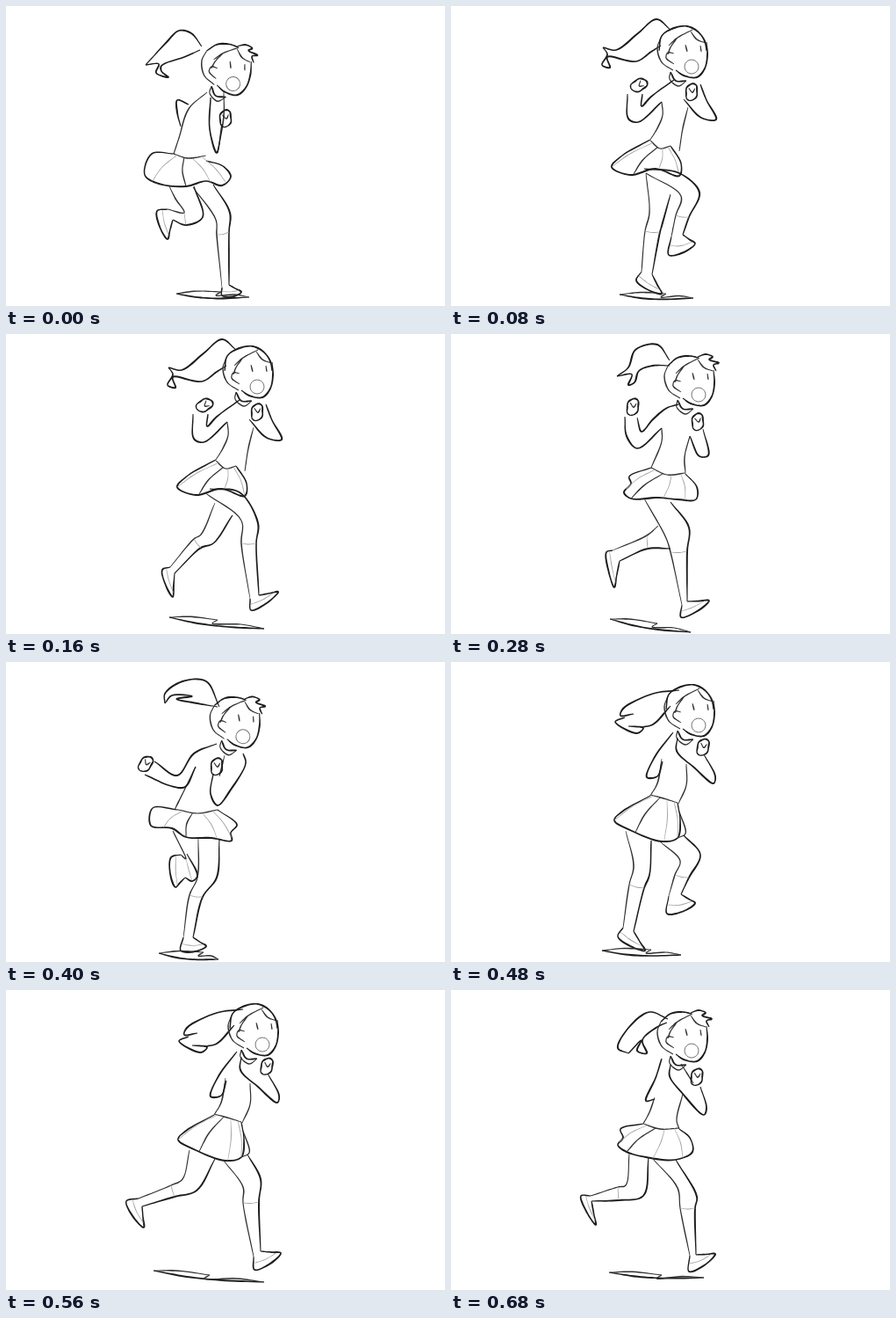
Recreate the animation shown at these times as an HTML page. Size 500 by 341 pixels, loop 0.8 s.

```html
<!DOCTYPE html>
<html lang="en">
<head>
<meta charset="utf-8">
<title>Run cycle</title>
<style>
html, body { margin: 0; width: 100%; height: 100%; overflow: hidden; background: #fff; }
svg { display: block; width: 100%; height: 100%; }
.pose { visibility: hidden; animation: 800ms step-end infinite; }
.short { animation-name: short; }
.long { animation-name: long; }
@keyframes short { 0% { visibility: visible; } 10%, 100% { visibility: hidden; } }
@keyframes long { 0% { visibility: visible; } 15%, 100% { visibility: hidden; } }
</style>
</head>
<body>
<svg id="stage" viewBox="0 0 500 341"></svg>
<script>
const NS = 'http://www.w3.org/2000/svg';
const stage = document.getElementById('stage');
const pens = { bold: [1.9, '#1c1c1c'], mid: [1.4, '#303030'], light: [.9, '#a4a4a4'] };

function add(parent, tag, attrs) {
  const el = document.createElementNS(NS, tag);
  for (const k in attrs) el.setAttribute(k, attrs[k]);
  return parent.appendChild(el);
}

const mix = (a, b, u) => [a[0] + (b[0] - a[0]) * u, a[1] + (b[1] - a[1]) * u];
const shift = (p, x, y) => [p[0] + x, p[1] + y];
const gap = (a, b) => Math.hypot(b[0] - a[0], b[1] - a[1]);

function points(text) {
  const n = text.split(' ').map(Number), out = [];
  for (let i = 0; i < n.length; i += 2) out.push([n[i], n[i + 1]]);
  return out;
}

// Centripetal spline through the points.
function curve(pts) {
  const last = pts.length - 1, out = [];
  const span = pts.slice(1).map((p, i) => Math.sqrt(gap(pts[i], p)) || 1);
  const slope = pts.map((p, i) => [0, 1].map(k => {
    const rise = j => (pts[j + 1][k] - pts[j][k]) / span[j];
    if (i === 0) return rise(0);
    if (i === last) return rise(last - 1);
    return (rise(i - 1) * span[i] + rise(i) * span[i - 1]) / (span[i - 1] + span[i]);
  }));
  for (let i = 0; i < last; i++) {
    for (let s = i ? 1 : 0; s <= 8; s++) {
      const u = s / 8, v = 1 - u;
      out.push([0, 1].map(k =>
        pts[i][k] * v * v * (1 + 2 * u) + pts[i + 1][k] * u * u * (3 - 2 * u) +
        span[i] * u * v * (slope[i][k] * v - slope[i + 1][k] * u)));
    }
  }
  return out;
}

// Pen line that swells in the middle and thins at both ends.
function ink(g, pts, pen = 'mid') {
  const [width, fill] = pens[pen];
  const line = curve(pts), end = line.length - 1, left = [], right = [];
  line.forEach(([x, y], i) => {
    const p = line[Math.max(0, i - 1)], q = line[Math.min(end, i + 1)];
    const swell = .55 + .45 * Math.sqrt(Math.sin(Math.PI * i / end) + 1e-6);
    const r = width / 2 * swell * (1 + .13 * Math.sin(i * .5 + pts[0][0])) / (gap(p, q) || 1);
    const dx = (q[0] - p[0]) * r, dy = (q[1] - p[1]) * r;
    left.push((x - dy).toFixed(1) + ' ' + (y + dx).toFixed(1));
    right.unshift((x + dy).toFixed(1) + ' ' + (y - dx).toFixed(1));
  });
  add(g, 'path', { d: 'M' + left.concat(right).join('L') + 'Z', fill });
}

const strokes = (g, text, pen) => text.split('/').forEach(s => ink(g, points(s), pen));

// The head is drawn around its own centre.
const face = {
  bold: '29 -12 30 3 27 18 18 28 3 26 -6 20/-12 22 -6 32 6 32',
  mid: '-23 -17 -27 -5 -22 11 -9 20/-8 1 -15 0 -17 6 -8 13/5 -9 7 -1/22 -8 23 -1/-12 22 -13 30 -3 38 6 32',
  bangs: '-14 -8 -4 -17 13 -26/-5 -16 -12 -6 -15 2/11 -24 18 -15 28 -11'
};
const tops = {
  smooth: '-25 -2 -22 -19 -8 -28 7 -30 19 -24 27 -13 29 -2',
  tuft: '-23 -17 -12 -26 2 -28 12 -26/11 -27 20 -30 28 -27 24 -24 35 -20 29 -18 32 -11'
};

function drawHead(g, [x, y, turn, top]) {
  const h = add(g, 'g', { transform: `translate(${x} ${y}) rotate(${turn})` });
  strokes(h, face.bold, 'bold');
  strokes(h, face.mid);
  strokes(h, face.bangs);
  strokes(h, tops[top], 'bold');
  add(h, 'ellipse', { cx: 12, cy: 16, rx: 8, ry: 8, fill: 'none', stroke: '#777' });
}

function drawFist(g, [x, y, turn]) {
  const f = add(g, 'g', { transform: `translate(${x} ${y}) rotate(${turn})` });
  const ring = [];
  for (let a = 0; a <= 10; a++) {
    const t = a * Math.PI / 5 + 1.6, r = 1 + .08 * Math.sin(a * 2.5);
    ring.push([6.5 * r * Math.cos(t), 10 * r * Math.sin(t)]);
  }
  ink(f, ring, 'bold');
  ink(f, [[-4, -4], [1, 0], [3, -5]]);
}

// Folds run from the waist to the hem.
function drawSkirt(g, outline, waist) {
  const rim = points(outline), top = points(waist);
  ink(g, rim, 'bold');
  ink(g, top);
  const hem = curve(rim), belt = curve(top);
  const pick = (line, u) => line[Math.round(u * (line.length - 1))];
  for (const u of [.15, .4, .65, .85]) {
    const a = pick(belt, u), b = pick(hem, .2 + .6 * u);
    ink(g, [a, shift(mix(a, b, .5), u < .6 ? -3 : 2, -1), b], u === .4 ? 'mid' : 'light');
  }
}

// Two contours end at the ankle; the sock line joins the points before it.
function drawLeg(g, [back, front, heel, toe]) {
  const a = points(back), b = points(front);
  const A = a[a.length - 1], B = b[b.length - 1];
  ink(g, a);
  ink(g, b, 'bold');
  const p = a[a.length - 2], q = b[b.length - 2], cuff = mix(p, q, .5);
  ink(g, [p, shift(cuff, 0, 1), q], 'light');
  const ankle = mix(A, B, .5), sole = mix(heel, toe, .5), d = gap(ankle, sole) || 1;
  const arch = mix(ankle, sole, 1 + 4 / d);
  ink(g, [A, heel, arch, toe, mix(toe, B, .45), B], 'bold');
  ink(g, [mix(A, heel, .5), mix(ankle, sole, .75), mix(toe, B, .2)], 'light');
}

function drawShadow(g, [start, end, kink]) {
  ink(g, [start, shift(mix(start, kink, .45), 0, -2), kink]);
  ink(g, [start, shift(mix(start, end, .3), 0, 3), shift(mix(start, end, .6), 0, 3), end], 'bold');
  ink(g, [kink, shift(kink, -6, 4), mix(kink, end, .5), end]);
}

function drawUpper(g, p) {
  strokes(g, p.hair, 'bold');
  drawHead(g, p.head);
  strokes(g, p.body);
  strokes(g, p.arms, 'bold');
  p.fists.forEach(f => drawFist(g, f));
  drawSkirt(g, p.skirt, p.waist);
}

const passRight = {
  head: [249, 71, 8, 'tuft'],
  hair: '223 46 211 31 197 28 183 41 159 67/159 67 174 66 171 76 185 81 177 74 177 68 203 58 221 50',
  body: '229 98 208 117 197 150 191 168/248 98 248 125 241 167',
  arms: '233 104 232 140 240 167 246 134/208 112 195 107 195 121 199 137',
  fists: [[250, 128, 5]],
  skirt: '192 168 166 168 158 192 174 202 205 205 228 199 246 204 256 194 247 182 228 176',
  waist: '191 168 207 173 228 170',
  legs: [
    ['186 205 193 219 203 235 184 231', '214 205 224 240 205 249 190 243', [172, 233], [184, 265]],
    ['213 206 239 243 240 260 246 320', '236 203 255 235 254 257 254 317', [246, 329], [268, 325]]
  ],
  shadow: [[194, 327], [277, 331], [245, 325]]
};

const leapRight = {
  head: [274, 44, 0, 'smooth'],
  hair: '262 18 246 6 225 22 200 41 185 38/185 38 190 46 184 58 193 61 190 49 223 54 240 43 251 36',
  body: '252 100 253 115 247 130 239 143/282 106 276 130 272 156',
  arms: '266 75 240 94 229 105 230 91/252 100 225 123 214 119 213 91/296 80 303 98 314 120 297 118 277 97',
  fists: [[226, 81, 65], [286, 89, 10]],
  skirt: '239 143 207 161 195 174 216 183 245 176 272 184 274 170 262 150',
  waist: '239 144 250 153 262 150',
  legs: [
    ['226 180 268 212 268 238 278 301', '232 176 266 180 287 215 285 238 288 297', [279, 314], [310, 293]],
    ['238 192 222 228 214 233 187 265', '258 206 236 238 222 243 192 272', [178, 268], [190, 299]]
  ],
  shadow: [[186, 322], [294, 335], [241, 325]]
};

const landRight = {
  head: [270, 53, 0, 'tuft'],
  hair: '249 30 235 12 210 18 202 38 189 48/189 48 206 46 202 58 209 55 214 42 230 36 249 36',
  body: '240 107 240 122 228 152/272 116 266 140 267 158',
  arms: '212 95 217 111 230 97 246 84 259 80/198 94 200 116 212 130 240 107/287 108 293 138 283 139 272 116',
  fists: [[207, 83, 15], [281, 100, 5]],
  skirt: '228 152 203 162 205 170 197 180 205 187 236 186 258 188 279 188 280 174 267 159',
  waist: '228 152 246 160 267 158',
  legs: [
    ['220 187 245 232 250 248 263 308', '250 191 271 220 269 247 269 304', [262, 322], [294, 303]],
    ['236 218 223 229 184 246', '250 244 224 244 192 258', [177, 248], [186, 288]]
  ],
  shadow: [[181, 324], [273, 339], [235, 329]]
};

const passLeft = {
  head: [259, 68, 4, 'tuft'],
  hair: '243 51 228 22 201 22 181 36 181 47/181 47 189 38 212 39 194 42 218 47 241 51',
  body: '216 119 198 156 192 168/249 106 243 130',
  arms: '169 113 195 129 214 104 240 93/158 128 188 141 204 142 216 119/270 104 273 115 256 145 241 163 233 150 236 127',
  fists: [[159, 116, 40], [240, 119, 10]],
  skirt: '196 168 167 166 165 186 189 189 205 199 234 200 257 203 256 194 263 185 241 168',
  waist: '196 168 218 172 241 168',
  legs: [
    ['190 192 205 224 199 219', '206 218 218 243 212 249 204 245', [188, 222], [193, 256]],
    ['219 199 218 245 209 265 202 313', '243 202 240 245 224 267 213 313', [199, 328], [228, 323]]
  ],
  shadow: [[174, 331], [242, 338], [225, 330]]
};

const leapLeft = {
  head: [280, 46, 0, 'smooth'],
  hair: '270 22 240 26 206 43 203 51 218 49/208 53 197 58 222 71 229 65 212 63/228 64 240 61 260 40',
  body: '250 100 245 128 237 142/278 106 278 130 269 151/270 160 277 185 268 190',
  arms: '263 70 242 98 233 121 245 120 251 103/268 76 267 91 287 110 309 128 311 120 298 95',
  fists: [[297, 87, 20]],
  skirt: '237 142 205 160 196 170 216 182 250 194 268 190 271 170 268 150',
  waist: '237 141 252 145 268 150',
  legs: [
    ['209 182 201 215 188 222 151 237', '238 192 217 228 192 235 155 246', [137, 240], [157, 270]],
    ['248 194 270 224 270 242 282 303', '275 187 290 215 288 241 290 297', [283, 318], [313, 299]]
  ],
  shadow: [[168, 319], [294, 332], [232, 324]]
};

const landLeft = {
  head: [262, 53, 0, 'tuft'],
  hair: '247 33 226 25 203 42 190 66 202 72/202 72 217 57 212 69 223 72 218 57 235 42 246 37',
  body: '232 122 226 139 219 152/264 118 257 148 260 158/262 84 276 106',
  arms: '240 78 233 100 222 126 232 124/250 85 249 98 264 118 288 142 291 134 284 110',
  fists: [[280, 99, 15]],
  skirt: '219 152 193 158 196 168 190 176 200 184 222 190 255 193 275 184 272 168 260 158',
  waist: '219 152 238 158 260 157',
  legs: [
    ['203 186 199 222 190 224 159 234', '225 190 219 234 191 239 160 240', [148, 234], [165, 267]],
    ['230 192 258 225 261 248 272 302', '256 193 280 235 278 248 279 301', [271, 320], [301, 300]]
  ],
  shadow: [[180, 321], [288, 327], [240, 324]]
};

// Push-offs carry the coming leap's upper body, lower and further back.
const pushRight = {
  upper: leapRight, dx: -12, dy: 9,
  legs: [
    ['222 190 262 216 256 238 251 262', '220 185 260 190 283 212 271 240 264 260', [248, 283], [278, 270]],
    ['222 190 226 235 221 256 217 302', '250 214 240 250 238 257 229 305', [211, 312], [240, 327]]
  ],
  shadow: [[192, 328], [276, 332], [245, 327]]
};

const pushLeft = {
  upper: leapLeft, dx: -10, dy: 10,
  legs: [
    ['238 204 261 226 255 242 248 266', '265 197 284 219 271 245 262 264', [246, 286], [278, 274]],
    ['199 192 208 232 203 253 196 302', '228 203 226 242 220 257 208 306', [190, 312], [221, 328]]
  ],
  shadow: [[172, 328], [262, 333], [228, 327]]
};

let start = 0;
function addPose(pose, hold) {
  const g = add(stage, 'g', {
    class: 'pose ' + (hold === 80 ? 'short' : 'long'),
    style: `animation-delay:${start - 800}ms`
  });
  const { upper = pose, dx = 0, dy = 0 } = pose;
  drawUpper(add(g, 'g', { transform: `translate(${dx} ${dy})` }), upper);
  pose.legs.forEach(leg => drawLeg(g, leg));
  drawShadow(g, pose.shadow);
  start += hold;
}

addPose(passRight, 80);
addPose(pushRight, 80);
addPose(leapRight, 120);
addPose(landRight, 120);
addPose(passLeft, 80);
addPose(pushLeft, 80);
addPose(leapLeft, 120);
addPose(landLeft, 120);
</script>
</body>
</html>
```
